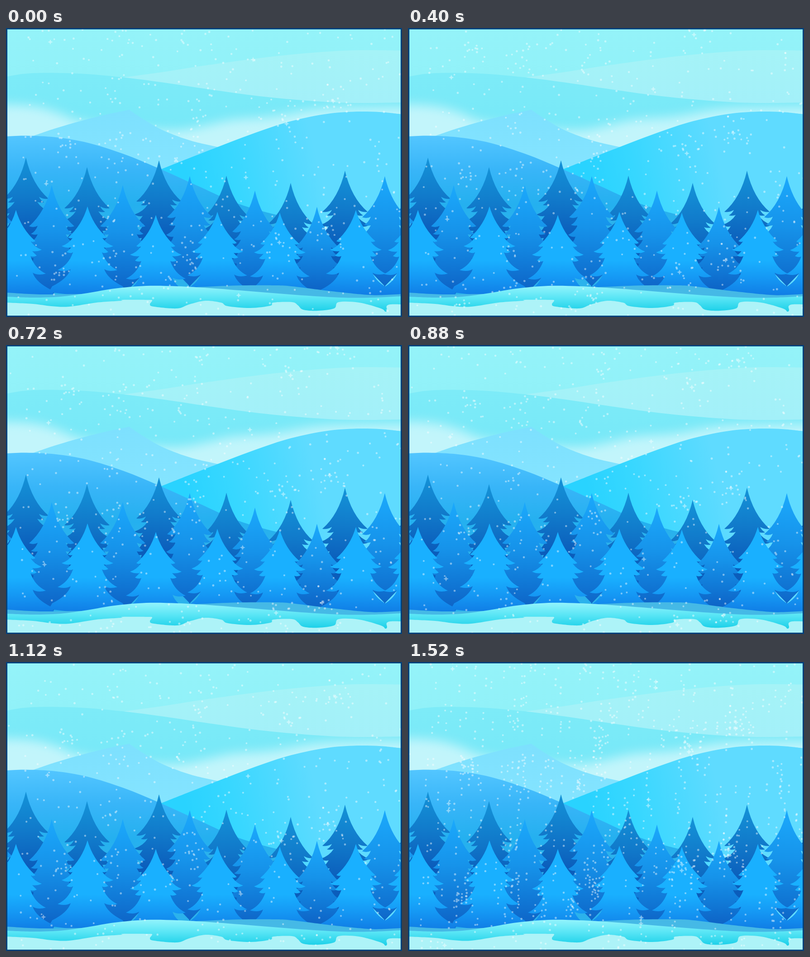
Animation of 875x640 px, one loop 1640 ms. Source, as an HTML page with a canvas:

```html
<!DOCTYPE html>
<html lang="en">
<head>
<meta charset="utf-8">
<title>Snowfall</title>
<style>
  html, body { margin: 0; width: 100%; height: 100%; overflow: hidden; background: #06437a; }
  canvas { display: block; }
</style>
</head>
<body>
<canvas id="stage" width="875" height="640"></canvas>
<script>
const W = 875, H = 640, EDGE = 3;
const LOOP = 1640, STEP = 80, STEPS = 20;
const view = document.getElementById('stage').getContext('2d');

const scene = document.createElement('canvas');
scene.width = W;
scene.height = H;
const g = scene.getContext('2d');

function gradient(x0, y0, x1, y1, ...stops) {
  const fill = g.createLinearGradient(x0, y0, x1, y1);
  stops.forEach(([at, color]) => fill.addColorStop(at, color));
  return fill;
}

const vertical = (y0, y1, ...stops) => gradient(0, y0, 0, y1, ...stops);

// Smooth ridge through flat [x, y, x, y, ...] points, closed along a base line.
function ridge(p, base = H) {
  const path = new Path2D();
  const n = p.length / 2;
  const at = i => {
    const k = Math.max(0, Math.min(n - 1, i)) * 2;
    return [p[k], p[k + 1]];
  };
  path.moveTo(p[0], base);
  path.lineTo(p[0], p[1]);
  for (let i = 0; i < n - 1; i++) {
    const [a, b, c, d] = [at(i - 1), at(i), at(i + 1), at(i + 2)];
    path.bezierCurveTo(
      b[0] + (c[0] - a[0]) / 6, b[1] + (c[1] - a[1]) / 6,
      c[0] - (d[0] - b[0]) / 6, c[1] - (d[1] - b[1]) / 6,
      c[0], c[1]);
  }
  path.lineTo(p[p.length - 2], base);
  path.closePath();
  return path;
}

function paint(path, fill) {
  g.fillStyle = fill;
  g.fill(path);
}

// Half a tree: quadratic segments [cx, cy, x, y] from the tip down.
function halfTree(segments, depth) {
  const path = new Path2D();
  path.moveTo(0, 0);
  segments.forEach(s => path.quadraticCurveTo(...s));
  path.lineTo(-1, depth);
  path.closePath();
  return path;
}

function plant(tips, shape, fillAt) {
  tips.forEach(([x, y]) => {
    [1, -1].forEach(side => {
      g.save();
      g.translate(x, y);
      g.scale(side, 1);
      paint(shape, fillAt(y));
      g.restore();
    });
  });
}

function drawSky() {
  g.fillStyle = vertical(0, 170, [0, '#94f3f9'], [1, '#8ff0f8']);
  g.fillRect(0, 0, W, H);

  paint(ridge([262, 109, 350, 97, 440, 83, 600, 62, 750, 50, 875, 50], 190),
    vertical(50, 166, [0, '#a5f3f7'], [1, '#a3f0f9']));

  const slope = ridge([0, 108, 35, 102, 75, 99.5, 115, 99.5, 180, 102, 265, 110,
    350, 121, 450, 136, 560, 151, 680, 162, 770, 166, 875, 165]);
  paint(slope, vertical(100, 240, [0, '#7debf8'], [1, '#76e8f8']));

  g.save();
  g.clip(slope);
  g.filter = 'blur(12px)';
  paint(ridge([-60, 168, 50, 172, 110, 186, 165, 207, 280, 222, 380, 226, 440, 216,
    500, 203, 590, 196, 690, 180, 800, 176, 940, 176]), '#c2f5fb');
  g.restore();
}

function drawHills() {
  const left = ridge([60, 239, 110, 222, 165, 206, 220, 192, 273, 181], 400);
  const right = ridge([272.5, 181, 305, 203, 350, 228, 410, 250, 475, 265], 400);
  const far = vertical(181, 310, [0, '#7de0fe'], [1, '#84e4ff']);
  paint(left, far);
  paint(right, far);

  paint(ridge([342, 313, 400, 290, 469, 263, 540, 236, 620, 209, 700, 191.5,
    765, 185.5, 825, 186, 875, 191]),
    gradient(400, 330, 680, 260, [0, '#29d3ff'], [0.35, '#37d7ff'], [1, '#5fdbff']));

  paint(ridge([0, 240, 45, 238.5, 110, 242, 180, 254, 260, 279, 340, 312,
    420, 348, 500, 384, 560, 404, 620, 419]),
    vertical(238, 430, [0, '#53c6ff'], [0.4, '#38b5f8'], [0.8, '#24b0ef'], [1, '#2bb2ec']));
}

function drawTrees() {
  const back = halfTree([
    [14, 60, 50, 91], [40, 93, 29, 87], [32, 94, 40, 99], [32, 101, 25, 98],
    [34, 113, 54, 120], [44, 126, 36, 123], [42, 133, 50, 139], [40, 142, 34, 141],
    [42, 160, 60, 170], [48, 174, 38, 172], [44, 190, 58, 200]
  ], 250);
  plant([[44, 287], [179, 308], [338, 293], [487, 327], [629, 343], [749, 316], [918, 312]],
    back, y => vertical(0, 165, [0, '#1493d8'], [0.5, '#117bcb'], [1, '#0b5dbb']));

  const mid = halfTree([
    [14, 60, 50, 91], [40, 95, 31, 90], [36, 103, 46, 108], [38, 111, 31, 109],
    [38, 124, 52, 130], [44, 136, 36, 134], [40, 148, 52, 154], [46, 162, 40, 162],
    [44, 180, 52, 190]
  ], 245);
  plant([[-35, 340], [101, 348], [258, 348], [406, 328], [550, 360], [687, 396], [837, 328]],
    mid, y => vertical(0, 575 - y, [0, '#1ba9fc'], [0.45, '#1693ea'], [0.75, '#117bd8'], [1, '#0e66c8']));

  const front = halfTree([
    [12, 42, 43, 69], [38, 72, 33, 70], [42, 83, 57, 88], [46, 93, 36, 91],
    [40, 96, 46, 101], [38, 105, 32, 102], [42, 130, 66, 141], [48, 146, 37, 139],
    [44, 160, 78, 177], [80, 180, 85, 190]
  ], 200);
  plant([[22, 403], [180, 395], [331, 414], [467, 407], [605, 409], [773, 403], [901, 404]],
    front, y => vertical(515 - y, 592 - y, [0, '#19b0ff'], [0.5, '#1598f4'], [1, '#107de5']));
}

function drawGround() {
  const shade = '#45b9e6';
  paint(ridge([0, 586, 80, 590, 170, 589, 240, 590], 620), shade);
  paint(ridge([400, 575, 440, 573, 520, 570, 600, 570, 640, 573, 720, 583,
    800, 591, 840, 591, 875, 589], 620), shade);

  paint(ridge([0, 595, 60, 597, 120, 595, 180, 587, 240, 577, 310, 571, 380, 572,
    450, 576, 540, 583, 640, 591, 740, 597, 810, 597, 875, 594]),
    vertical(571, 626, [0, '#92f3fc'], [0.5, '#58e5f5'], [1, '#1fd1e9']));

  paint(ridge([0, 608, 60, 611, 100, 616, 140, 617, 200, 608, 254, 604, 257, 602,
    310, 602, 323, 603, 318, 612, 327, 617, 378, 621, 405, 612, 440, 604, 475, 608,
    490, 616, 540, 620, 584, 615, 591, 608, 632, 607, 645, 614, 657, 624, 690, 626,
    725, 621, 735, 607, 780, 608, 828, 621, 838, 628, 842, 625, 841, 616, 850, 612, 875, 612]),
    '#adf3f8');
}

drawSky();
drawHills();
drawTrees();
drawGround();

let seed = 20;
function rand() {
  seed = (seed * 1664525 + 1013904223) % 4294967296;
  return seed / 4294967296;
}
const spread = r => (rand() + rand() - 1) * r;

// Each flake falls by `fall` and drifts by `drift` during one loop.
const FALLS = [262, 282, 314];
const flakes = [];
for (let i = 0; i < 190; i++) {
  const fall = FALLS[i % 3];
  flakes.push({ x: rand() * 920, y: rand() * fall, fall, drift: -9 - rand() * 8, r: 1.9 + rand() * 0.6 });
}

const clusters = [[410, 5, 262], [268, -8, 262], [140, 268, 282], [622, 212, 263], [726, 158, 282], [437, 170, 314]];
clusters.forEach(([x, y, fall]) => {
  for (let i = 0; i < 10; i++) {
    flakes.push({ x: x + spread(36), y: y + spread(55), fall, drift: -14, r: 2 + rand() * 0.5 });
  }
});

const stars = [[98, 31, 314, -9], [546, 70, 261, -16], [620, 212, 263, -16], [723, 162, 282, -17]];
stars.forEach(([x, y, fall, drift]) => flakes.push({ x, y, fall, drift, star: true }));

function addStar(x, y) {
  const tip = 5.8, waist = 1.7;
  for (let i = 0; i < 8; i++) {
    const r = i % 2 ? waist * 1.5 : tip;
    const a = i * Math.PI / 4;
    view[i ? 'lineTo' : 'moveTo'](x + r * Math.cos(a), y + r * Math.sin(a));
  }
  view.closePath();
}

function drawFlakes(step) {
  view.fillStyle = 'rgba(255,255,255,.43)';
  for (const f of flakes) {
    for (let k = -1; k < 4; k++) {
      const t = k + step / STEPS;
      const x = f.x + f.drift * t;
      const y = f.y + f.fall * t;
      if (y < -6 || y > H + 6) continue;
      view.beginPath();
      if (f.star) addStar(x, y);
      else view.arc(x, y, f.r, 0, Math.PI * 2);
      view.fill();
    }
  }
}

function draw() {
  const step = Math.min(STEPS - 1, Math.floor(performance.now() % LOOP / STEP));
  view.fillStyle = '#06437a';
  view.fillRect(0, 0, W, H);
  view.save();
  view.beginPath();
  view.rect(EDGE, EDGE, W - 2 * EDGE, H - 2 * EDGE);
  view.clip();
  view.drawImage(scene, 0, 0);
  // The last step keeps the previous snow visible.
  if (step === STEPS - 1) drawFlakes(step - 1);
  drawFlakes(step);
  view.restore();
  requestAnimationFrame(draw);
}
draw();
</script>
</body>
</html>
```
